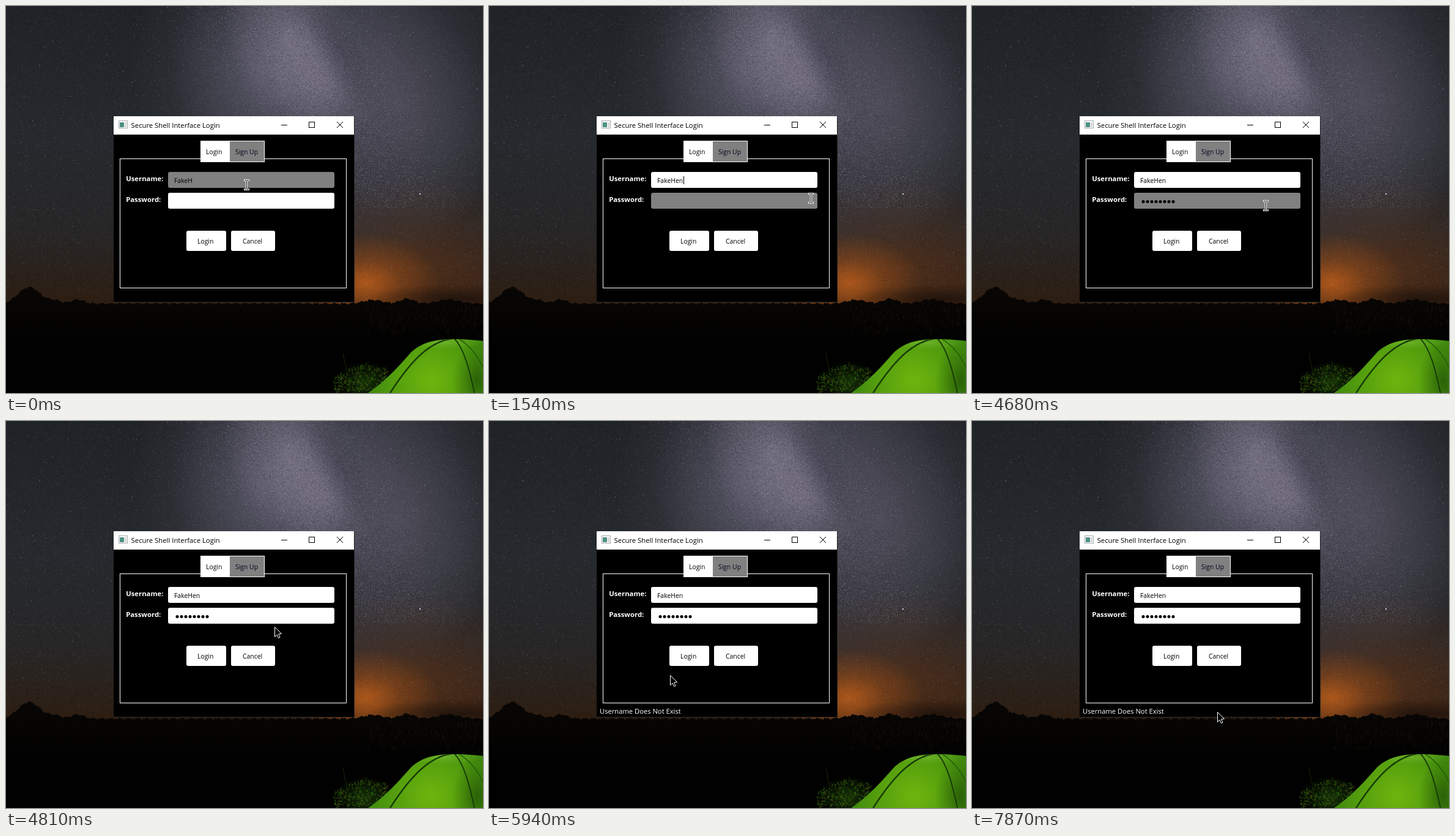
Recreate the animation shown at these times as an HTML page with a canvas. Size 780 by 632 pixels, loop 7.99 s.

```html
<!DOCTYPE html>
<html lang="en">
<head>
<meta charset="utf-8">
<title>Login window</title>
<style>
html, body { margin: 0; width: 100%; height: 100%; overflow: hidden; background: #000; }
canvas { display: block; }
</style>
</head>
<body>
<canvas id="stage" width="780" height="632"></canvas>
<script>
const W = 780, H = 632, LOOP = 7990, STEP = 120;
const USER = 'FakeHen', MASK_LENGTH = 8;
const GRAY = '#808080';
const openSans = size => `${size}px "Open Sans", sans-serif`;
const SMALL = openSans(10.4), TITLE = openSans(11.3), STATUS = openSans(11.2);
const LABEL = 'bold ' + TITLE;

// Each glide starts where the last one ended and advances once per STEP
const POINTER_START = { x: 393, y: 292 };
const GLIDES = [
  { at: 1060, steps: 7, via: [{ x: 600, y: 302 }, { x: 527, y: 314 }, { x: 520, y: 316 }] },
  { at: 4680, steps: 6, via: [{ x: 439, y: 336 }, { x: 328, y: 391 }, { x: 328, y: 391 }] },
  { at: 5940, steps: 7, via: [{ x: 215, y: 476 }, { x: 178, y: 471 }] },
  { at: 6910, steps: 2, via: [{ x: 271, y: 464 }] },
  { at: 7180, steps: 1, via: [{ x: 345, y: 462 }] },
  { at: 7600, steps: 2, via: [{ x: 434, y: 475 }] },
  { at: 7870, steps: 1, via: [{ x: 401, y: 475 }] }
];

const ctx = document.getElementById('stage').getContext('2d');
const backdrop = paintBackdrop();

function pointerAt(t) {
  let from = POINTER_START;
  for (const { at, steps, via } of GLIDES) {
    if (t < at) break;
    const path = [from, ...via];
    const step = Math.min(steps, Math.floor((t - at) / STEP) + 1);
    const along = step / steps * via.length;
    const i = Math.min(via.length - 1, Math.floor(along));
    const mix = axis => Math.round(path[i][axis] + (path[i + 1][axis] - path[i][axis]) * (along - i));
    from = { x: mix('x'), y: mix('y') };
  }
  return from;
}

function seeded(seed) {
  return () => (seed = (seed * 16807) % 2147483647) / 2147483647;
}

function paintBackdrop() {
  const canvas = document.createElement('canvas');
  canvas.width = W;
  canvas.height = H;
  const c = canvas.getContext('2d');
  paintSky(c);
  paintStars(c);
  paintMountains(c);
  paintBush(c);
  paintTent(c);
  return canvas;
}

function glow(c, x, y, rx, ry, rgb, alpha, tilt = 0) {
  c.save();
  c.translate(x, y);
  c.rotate(tilt);
  c.scale(rx, ry);
  const g = c.createRadialGradient(0, 0, 0, 0, 0, 1);
  g.addColorStop(0, `rgba(${rgb},${alpha})`);
  g.addColorStop(0.45, `rgba(${rgb},${alpha * 0.52})`);
  g.addColorStop(1, `rgba(${rgb},0)`);
  c.fillStyle = g;
  c.fillRect(-1, -1, 2, 2);
  c.restore();
}

function paintSky(c) {
  const sky = c.createLinearGradient(0, 0, 0, 490);
  sky.addColorStop(0, '#1f2226');
  sky.addColorStop(0.45, '#26292d');
  sky.addColorStop(0.75, '#272627');
  sky.addColorStop(1, '#2d1d11');
  c.fillStyle = sky;
  c.fillRect(0, 0, W, H);
  glow(c, 520, 110, 310, 340, '96,93,114', 0.68, -0.4);
  glow(c, 420, 110, 150, 180, '112,108,128', 0.5, -0.2);
  glow(c, 465, 55, 105, 150, '146,140,158', 0.5, -0.3);
  glow(c, 515, 125, 80, 110, '146,138,156', 0.38, -0.6);
  glow(c, 640, 160, 150, 220, '104,99,114', 0.42, -0.4);
  glow(c, 545, 75, 35, 110, '28,28,40', 0.3, -0.5);
  glow(c, 670, 430, 260, 150, '112,58,24', 0.5);
  glow(c, 588, 452, 120, 80, '186,92,26', 0.75);
  glow(c, 590, 452, 55, 35, '200,100,30', 0.35);
  glow(c, 740, 478, 150, 24, '28,16,10', 0.8);
}

function paintStars(c) {
  const rnd = seeded(4217);
  const bell = () => rnd() + rnd() + rnd() - 1.5;
  const dot = (x, y, color) => {
    c.fillStyle = color;
    c.fillRect(Math.floor(x), Math.floor(y), 1, 1);
  };
  for (let i = 0; i < 26000; i++) {
    dot(rnd() * W, rnd() * 470, rnd() < 0.5 ? 'rgba(0,0,0,.2)' : 'rgba(205,212,222,.11)');
  }
  for (let i = 0; i < 15000; i++) {
    const y = rnd() * 330;
    dot(430 + y * 0.55 + bell() * 150, y, rnd() < 0.45 ? 'rgba(15,15,25,.22)' : 'rgba(215,207,224,.18)');
  }
  for (let i = 0; i < 800; i++) {
    dot(rnd() * W, rnd() * 430, `rgba(205,210,220,${0.15 + 0.45 * rnd() ** 3})`);
  }
  c.fillStyle = '#cfd8e8';
  c.fillRect(676, 306, 2, 2);
}

function ridgeY(x) {
  const bump = (center, width, height) => height * Math.exp(-(((x - center) / width) ** 2));
  const jag = 1.2 * Math.sin(x * 0.43) + 0.9 * Math.sin(x * 0.97);
  return 486 + jag - bump(38, 25, 27) - bump(80, 14, 5) - bump(117, 14, 7)
    - bump(600, 22, 6) - bump(656, 16, 8) - bump(724, 24, 7);
}

function paintMountains(c) {
  const rnd = seeded(91);
  const rock = c.createLinearGradient(0, 475, 0, 555);
  rock.addColorStop(0, '#080604');
  rock.addColorStop(1, '#010101');
  c.fillStyle = rock;
  c.beginPath();
  c.moveTo(0, H);
  for (let x = 0; x <= W; x += 3) c.lineTo(x, ridgeY(x));
  c.lineTo(W, H);
  c.fill();
  c.lineWidth = 1;
  for (let i = 0; i < 200; i++) {
    const x = 590 + 190 * rnd();
    const y = ridgeY(x) + 3 + 48 * rnd();
    c.strokeStyle = `rgba(76,48,33,${0.08 + 0.22 * rnd()})`;
    c.beginPath();
    c.moveTo(x, y);
    c.lineTo(x - 4 + 8 * rnd(), y + 2 + 6 * rnd());
    c.stroke();
  }
}

function paintBush(c) {
  const rnd = seeded(733);
  glow(c, 588, 614, 50, 34, '30,70,10', 0.7);
  for (let i = 0; i < 380; i++) {
    const x = 537 + 88 * rnd();
    const top = 584 + Math.abs(x - 592) * 0.35;
    const y = top + (H - top) * rnd();
    c.strokeStyle = `rgba(${35 + 55 * rnd()},${65 + 85 * rnd()},16,.65)`;
    c.beginPath();
    c.moveTo(x, y);
    c.lineTo(x - 4 + 8 * rnd(), y - 4 * rnd());
    c.stroke();
  }
  c.strokeStyle = '#172608';
  c.beginPath();
  c.moveTo(558, 600);
  c.quadraticCurveTo(554, 584, 551, 567);
  c.stroke();
}

function paintTent(c) {
  const cloth = c.createRadialGradient(695, 612, 5, 695, 612, 110);
  cloth.addColorStop(0, '#6db30d');
  cloth.addColorStop(0.5, '#559f0e');
  cloth.addColorStop(1, '#3c860e');
  c.save();
  c.beginPath();
  c.moveTo(592, H);
  c.bezierCurveTo(622, 612, 644, 586, 662, 566);
  c.bezierCurveTo(684, 545, 716, 540, 780, 547);
  c.lineTo(W, H);
  c.closePath();
  c.fillStyle = cloth;
  c.fill();
  c.clip();
  glow(c, 770, 612, 40, 65, '14,54,2', 0.55);
  glow(c, 715, 549, 65, 11, '140,205,70', 0.45);
  const seam = (width, color, from, curve) => {
    c.lineWidth = width;
    c.strokeStyle = color;
    c.beginPath();
    c.moveTo(...from);
    c.bezierCurveTo(...curve);
    c.stroke();
  };
  seam(2.5, '#183d06', [735, 542], [698, 546, 668, 570, 628, 632]);
  seam(2, '#183d06', [732, 542], [749, 558, 758, 595, 766, 632]);
  seam(1.5, '#245d07', [738, 542], [762, 556, 776, 578, 784, 600]);
  c.restore();
}

function box(x, y, w, h, color, radius = 0) {
  ctx.fillStyle = color;
  ctx.beginPath();
  ctx.roundRect(x, y, w, h, radius);
  ctx.fill();
}

function frame(x, y, w, h, color) {
  ctx.strokeStyle = color;
  ctx.lineWidth = 1;
  ctx.strokeRect(x + 0.5, y + 0.5, w - 1, h - 1);
}

function text(str, x, y, font, color) {
  ctx.font = font;
  ctx.fillStyle = color;
  ctx.fillText(str, x, y);
}

function drawTitleBar() {
  box(176, 180, 393, 30, '#fff');
  frame(184, 187, 15, 13, '#a5a9ac');
  box(186, 190, 7, 8, '#4c9183');
  box(194, 190, 3, 8, '#d5d8d9');
  text('Secure Shell Interface Login', 204.6, 199, TITLE, '#000');
  box(450, 194, 10, 1, '#000');
  frame(495, 189, 10, 10, '#000');
  ctx.beginPath();
  ctx.moveTo(541, 189);
  ctx.lineTo(551, 199);
  ctx.moveTo(551, 189);
  ctx.lineTo(541, 199);
  ctx.stroke();
}

function drawPanel() {
  frame(186, 249, 371, 212, '#fff');
  box(318, 220, 105, 35, '#fff');
  box(366, 221, 56, 33, GRAY);
  text('Login', 327, 242, SMALL, '#000');
  text('Sign Up', 375, 242, SMALL, '#00001c');
  text('Username:', 196.2, 286, LABEL, '#fff');
  text('Password:', 196.2, 320, LABEL, '#fff');
}

function drawControls(t, inside) {
  const control = (x, y, w, h) => box(x, y, w, h, inside(x, y, w, h) ? GRAY : '#fff', 3);
  control(265, 271, 272, 26);
  control(265, 305, 272, 26);
  control(295, 367, 65, 33);
  control(368, 367, 72, 33);

  text(USER.slice(0, 5 + Math.floor(t / 250)), 275, 289, SMALL, '#000');
  text('Login', 313, 388, SMALL, '#000');
  text('Cancel', 387, 388, SMALL, '#000');

  ctx.fillStyle = '#000';
  for (let i = 0; i < MASK_LENGTH && t >= 2400 + 250 * i; i++) {
    ctx.beginPath();
    ctx.arc(280 + 7 * i, 319.5, 2.5, 0, Math.PI * 2);
    ctx.fill();
  }
  if (t >= 1060 && t < 1660) box(318, 278, 1, 13, '#000');
  if (t >= 5050 && t < 5540) box(333, 312, 1, 13, '#000');
}

function drawIBeam(x, y) {
  for (const [grow, color] of [[1, '#fff'], [0, '#000']]) {
    const bar = (dx, dy, w, h) => box(x + dx - grow, y + dy - grow, w + 2 * grow, h + 2 * grow, color);
    bar(-3, -8, 3, 1);
    bar(1, -8, 3, 1);
    bar(0, -7, 1, 14);
    bar(-3, 7, 3, 1);
    bar(1, 7, 3, 1);
  }
}

function drawArrow(x, y) {
  ctx.save();
  ctx.translate(x + 0.5, y + 0.5);
  const shape = new Path2D('M0 0V16L3.5 12.5L6 18L8.5 17L6 11.5L11 11Z');
  ctx.fillStyle = '#000';
  ctx.fill(shape);
  ctx.strokeStyle = '#fff';
  ctx.lineWidth = 1;
  ctx.stroke(shape);
  ctx.restore();
}

function draw(t) {
  const pointer = pointerAt(t);
  const inside = (x, y, w, h) =>
    pointer.x >= x && pointer.x < x + w && pointer.y >= y && pointer.y < y + h;
  ctx.drawImage(backdrop, 0, 0);
  box(176, 180, 394, 304, '#242424');
  box(176, 180, 393, 303, '#000');
  drawTitleBar();
  drawPanel();
  drawControls(t, inside);
  if (t >= 5690) text('Username Does Not Exist', 181, 478, STATUS, '#fff');
  const overField = inside(265, 271, 272, 26) || inside(265, 305, 272, 26);
  (overField ? drawIBeam : drawArrow)(pointer.x, pointer.y);
}

const start = performance.now();
function tick() {
  draw((performance.now() - start) % LOOP);
  requestAnimationFrame(tick);
}
tick();
</script>
</body>
</html>
```
